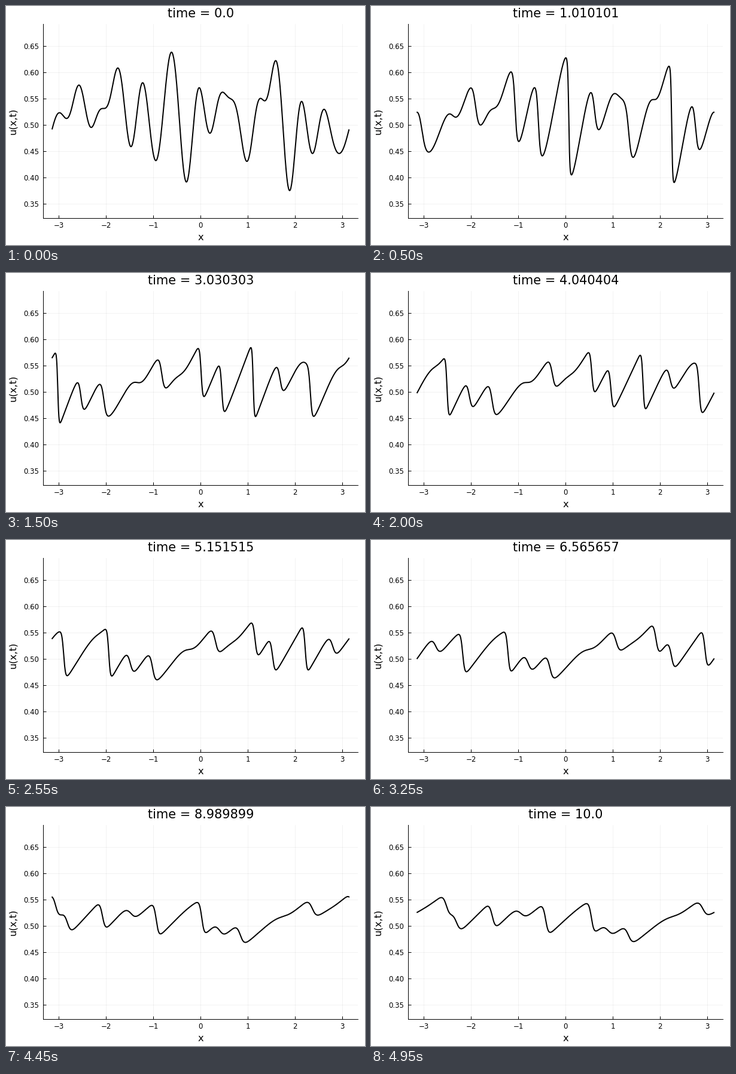
These frames come from a looping animation (600 by 400 pixels, 5 s). A matplotlib script:

```python
import numpy as np
import matplotlib.pyplot as plt
from matplotlib.animation import FuncAnimation

W, H, DPI = 600, 400, 100
PX = 72 / DPI
FRAMES, T_END = 100, 10.0
N, NU, SUBSTEPS = 1024, 0.001, 20
LEFT, RIGHT, TOP, BOTTOM = 62.4, 588.4, 30.4, 355.4

# Key points of the initial wave: its peaks and troughs, and two shoulders.
TURNS = np.array([
    (-2.987, .5235), (-2.84, .5125), (-2.575, .576), (-2.317, .4955),
    (-1.753, .6085), (-1.475, .459), (-1.228, .5805), (-.949, .4325),
    (-.618, .6385), (-.302, .3918), (-.032, .571), (.196, .4845),
    (.46, .5625), (.977, .431), (1.27, .5508), (1.352, .546),
    (1.585, .6225), (1.882, .3755), (2.133, .545), (2.367, .446),
    (2.608, .530), (2.93, .446)])
SHOULDERS = np.array([(-2.12, .53), (-1.98, .5355), (.57, .554), (.72, .541)])


def basis(x, modes):
    """Cosines and sines at x, and their derivatives."""
    a = np.outer(x, modes)
    one = np.ones((len(x), 1))
    value = np.hstack([one, np.cos(a), np.sin(a)])
    slope = np.hstack([0 * one, -modes * np.sin(a), modes * np.cos(a)])
    return value, slope


def initial_wave(x):
    """Smoothest Fourier sum through the key points, level at the turns."""
    modes = np.arange(1, 25)
    turn_value, turn_slope = basis(TURNS[:, 0], modes)
    side_value, _ = basis(SHOULDERS[:, 0], modes)
    spread = 0.03 * np.exp(-(modes / 16) ** 4)
    prior = np.diag(1 / np.concatenate([[1.0], spread, spread]))
    rows = np.vstack([turn_value / .001, turn_slope / .07,
                      side_value / .001, prior])
    goal = np.concatenate([TURNS[:, 1] / .001, np.zeros(len(TURNS)),
                           SHOULDERS[:, 1] / .001, np.zeros(len(prior))])
    coef = np.linalg.lstsq(rows, goal, rcond=None)[0]
    return basis(x, modes)[0] @ coef


def solve_burgers(u):
    """Spectral RK4 with an integrating factor for u_t + u u_x = nu u_xx."""
    k = np.arange(N // 2 + 1)
    gradient = -0.5j * k * (k < N // 3)
    dt = T_END / (FRAMES - 1) / SUBSTEPS
    half = np.exp(-NU * k ** 2 * dt / 2)
    full = half ** 2

    def flux(v):
        return gradient * np.fft.rfft(np.fft.irfft(v, N) ** 2)

    v = np.fft.rfft(u)
    waves = [u]
    for _ in range(FRAMES - 1):
        for _ in range(SUBSTEPS):
            a = flux(v)
            b = flux(half * (v + dt / 2 * a))
            c = flux(half * v + dt / 2 * b)
            d = flux(full * v + dt * half * c)
            v = full * v + dt / 6 * (full * a + 2 * half * (b + c) + d)
        waves.append(np.fft.irfft(v, N))
    return waves


x = -np.pi + 2 * np.pi * np.arange(N) / N
waves = solve_burgers(initial_wave(x))

plt.rcParams["font.family"] = "DejaVu Sans"
fig = plt.figure(figsize=(W / DPI, H / DPI), dpi=DPI, facecolor="white")
ax = fig.add_axes([LEFT / W, 1 - BOTTOM / H,
                   (RIGHT - LEFT) / W, (BOTTOM - TOP) / H])
x_ticks = np.arange(-3, 4)
y_ticks = 0.35 + 0.05 * np.arange(7)
ax.set_xlim(-3.329, 3.329)
ax.set_ylim(0.3228, 0.6917)
ax.set_xticks(x_ticks, [""] * len(x_ticks))
ax.set_yticks(y_ticks, [""] * len(y_ticks))
ax.tick_params(direction="in", length=5 * PX, width=PX)
ax.grid(color="black", alpha=0.1, linewidth=0.5 * PX)
ax.set_axisbelow(True)
ax.spines[["top", "right"]].set_visible(False)
ax.spines[["left", "bottom"]].set_linewidth(PX)


def label(px, py, text, size, **kw):
    """Text at a pixel position measured from the top left."""
    kw = {"ha": "center", "va": "baseline", **kw}
    return fig.text(px / W, 1 - py / H, text, fontsize=size, **kw)


for tick in x_ticks:
    label(325.3 + 79 * tick, 371, str(tick).replace("-", "\u2212"), 8.5)
for i, tick in enumerate(y_ticks):
    label(54.8, 336.2 - 44.1 * i, f"{tick:.2f}", 8.5, ha="right")
label(325.2, 391.5, "x", 11.8)
label(19.5, 192.4, "u(x,t)", 11.8, rotation=90, ha="right", va="center",
      rotation_mode="default")
title = label(325.5, 18.6, "", 15)
line, = ax.plot(x, waves[0], color="black", linewidth=2 * PX)


def draw(i):
    line.set_ydata(waves[i])
    title.set_text(f"time = {round(T_END * i / (FRAMES - 1), 6)}")
    return line, title


anim = FuncAnimation(fig, draw, frames=FRAMES, interval=50,
                     repeat=True, repeat_delay=0)
plt.show()
```
